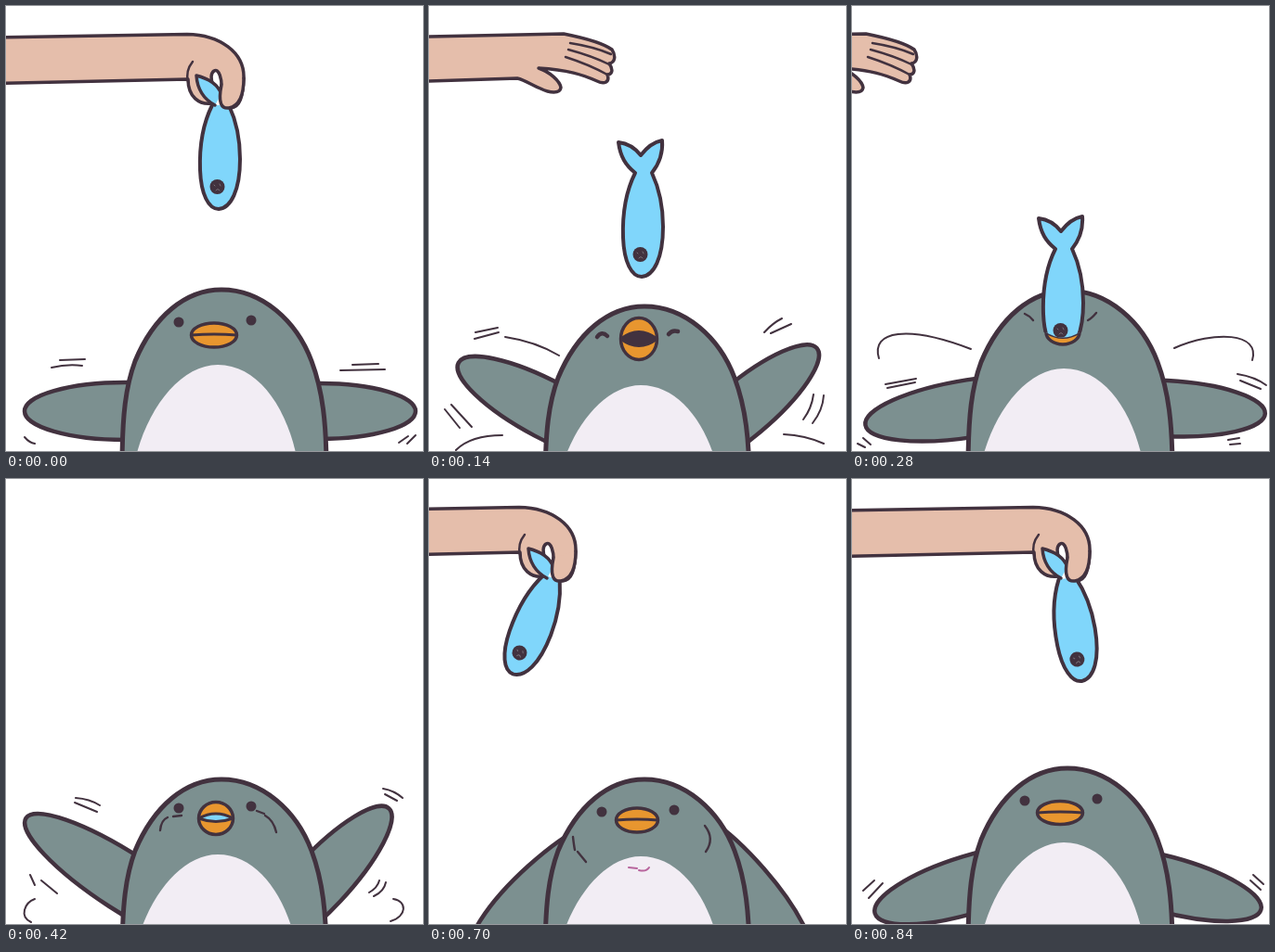
Recreate the animation shown at these times as an HTML page with a canvas. Size 449 by 480 pixels, loop 0.91 s.

```html
<!DOCTYPE html>
<html>
<head>
<meta charset="utf-8">
<style>
html, body { margin: 0; width: 449px; height: 480px; overflow: hidden; background: #fff }
canvas { display: block }
</style>
</head>
<body>
<canvas width="449" height="480"></canvas>
<script>
const ctx = document.querySelector('canvas').getContext('2d');
const INK = '#42323f', GREY = '#7c9090', SKIN = '#e5beab', BLUE = '#80d6fb', ORANGE = '#e8962f', BELLY = '#f2edf4';
const STEP = 70, STEPS = 13;

// Poses two steps apart; the step between them is their mean.
const keys = {
  body: [0, 18, 1, 18, 0, 18, 6],
  belly: [0, 22, 4, 18, 4, 20, 5],
  wingY: [437, 436, 434, 435, 436, 440, 437],
  leftAngle: [0, 28, -9, 33, -8, -42, -17],
  leftLength: [108, 109, 115, 127, 125, 110, 108],
  rightAngle: [0, -40, 3, -47, 16, 49, 15],
  rightLength: [103, 104, 107, 109, 106, 110, 106],
  eyeY: [341, 341, 341, 337, 341, 341, 341],
  beakX: [224, 226, 227, 226, 226, 224, 224],
  beakY: [355, 341, 351, 348, 347, 350, 354],
  beakW: [24.5, 19.5, 18, 18.5, 18, 22.5, 24.5],
  beakH: [13, 22.5, 13, 17.5, 14.5, 13, 12.5],
  upperLip: [-2, -15, -10, -10, 7, -2, -2],
  lowerLip: [-2, 15, 11, 7, 7, -2, -2]
};
const dotEyes = [1, 0, 0, 1, 0, 1, 1];
const thickMarks = [
  '', 'M181 339Q186 332 192 338M258 336Q262 331 268 333', '', '',
  'M179 339L188 338M262 338Q268 334 272 336', '', ''
];
const thinMarks = [
  '', '', 'M186 331Q191 333 195 338M254 338Q258 336 263 330',
  'M166 361Q167 350 174 347M180 346L189 345M270 340L278 343M279 345Q288 350 291 363',
  'M160 361Q166 351 174 349M186 347Q192 347 202 353M261 345L284 345M292 351Q298 357 300 367',
  'M155 368Q156 377 157 382M160 384L169 395M297 356Q308 370 298 384', ''
];
const streaks = [
  'M58 382L85 381M49 390Q66 386 82 388M373 387L401 386M360 393L408 392M20 465Q25 471 31 472M423 471L433 464M432 472L441 463',
  'M50 352L74 347M49 359L75 352M82 357Q115 362 140 377M361 352Q370 342 380 337M368 353L390 343M17 435L33 455M24 430L46 454M29 479Q45 463 79 463M403 446Q412 434 414 419M413 450Q424 436 425 420M382 462Q405 463 425 472',
  'M29 380C20 350 60 344 128 370M347 369C390 350 440 352 431 382M36 408L69 402M38 412L68 406M415 397Q434 400 446 409M418 404L440 413M6 472L14 476M12 466L20 473M405 468L417 466M407 473L418 472',
  'M75 344Q90 345 101 352M74 349L98 359M406 334Q418 336 427 344M408 340L421 347M26 427L31 438M38 433L55 447M31 453C20 457 14 472 27 478M391 446Q400 441 402 433M396 450Q407 445 409 435M417 453C432 455 432 472 414 477',
  '', '',
  'M12 444L24 433M18 452L33 436M429 433L440 443M432 427L443 437'
];

const FISH_BODY = 'M222 180C212 200 208 222 209 250C210 276 218 292 229 292C242 291 252 272 252 238C252 215 247 195 240 180';
const FREE_TAIL = 'C248 170 252 158 251 145C241 147 234 153 228 161C221 152 213 148 204 147C206 163 212 172 222 180Z';
const HELD_TAIL = 'M225 107C212 100 206 90 205 75C217 78 228 84 232 95';

ctx.lineCap = ctx.lineJoin = 'round';

function draw(path, fill, width, stroke = INK) {
  const shape = typeof path === 'string' ? new Path2D(path) : path;
  if (fill) { ctx.fillStyle = fill; ctx.fill(shape); }
  if (width) { ctx.strokeStyle = stroke; ctx.lineWidth = width; ctx.stroke(shape); }
}

function oval(x, y, rx, ry, fill, width, angle = 0) {
  const shape = new Path2D();
  shape.ellipse(x, y, rx, ry, angle * Math.PI / 180, 0, 7);
  draw(shape, fill, width);
}

function shifted(x, y, paint) {
  ctx.save();
  ctx.translate(x, y);
  paint();
  ctx.restore();
}

function fishEye() {
  oval(227.5, 268, 8, 8, INK);
  draw('M224 266L225 267M230 265L231 267M226 272Q228 269 230 272', null, 1, '#777078');
}

function openHand() {
  draw('M-300 39L145 30C160 33 186 39 197 47C201 53 201 61 194 62C199 69 197 74 192 74C195 82 189 85 181 81C165 74 150 69 118 67C130 71 141 81 142 88C141 95 130 94 120 89C110 85 104 80 95 78L-300 90', SKIN, 3.5);
  draw('M152 40Q178 44 196 52M150 47Q176 54 194 63M147 55Q172 63 192 74', null, 2.5);
}

function holdingHand(swing) {
  draw('M-300 39L195 30.5C230 31 257 50 256 78C255 98 252 109 242 110C230 109 231 103 232 92C233 78 229 67 224 70C220 73 221 78 222 84L222 105C208 107 196 98 196 79L-300 90', SKIN, 3.5);
  draw('M201 60Q193 70 196 82', null, 2.5);
  ctx.save();
  ctx.translate(232, 105);
  ctx.rotate(swing * Math.PI / 180);
  ctx.translate(-232, -105);
  shifted(0, -73, () => { draw(FISH_BODY, BLUE, 4); fishEye(); });
  ctx.restore();
  draw(HELD_TAIL, BLUE, 3.5);
  draw('M232 85C228 105 232 111 240 110C250 108 256 98 256 78', SKIN, 3.5);
}

function render(step) {
  const pose = step >> 1, next = (step + 1) >> 1, p = {};
  for (const k in keys) p[k] = (keys[k][pose] + keys[k][next]) / 2;
  ctx.clearRect(0, 0, 449, 480);

  oval(128, p.wingY, p.leftLength, 31, GREY, 4.5, p.leftAngle);
  oval(338, p.wingY, p.rightLength, 30, GREY, 4.5, p.rightAngle);
  draw(streaks[pose], null, 2);

  shifted(1, p.body, () =>
    draw('M124 500C124 440 128 410 138 383C158 335 192 306 231 306C275 306 312 340 328 383C340 415 344 450 344 500', GREY, 5));
  shifted(0, p.belly, () =>
    draw('M141 482C155 430 190 387 228 387C270 387 300 430 312 482V500H141Z', BELLY));
  if (pose === 5) draw('M215 419L224 420M226 422Q234 424 237 419', null, 2, '#b8659d');

  const x = p.beakX, y = p.beakY, w = p.beakW;
  shifted(0, p.body, () => {
    if (dotEyes[pose]) {
      oval(186, p.eyeY, 5.5, 5.5, INK);
      oval(264, p.eyeY - 2, 5.5, 5.5, INK);
    }
    draw(thickMarks[pose], null, 4.5);
    draw(thinMarks[pose], null, 2.4);
    oval(x, y, w, p.beakH, ORANGE, 3.5);
    draw(`M${x - w} ${y}Q${x} ${y + p.upperLip} ${x + w} ${y}Q${x} ${y + p.lowerLip} ${x - w} ${y}`,
      pose === 3 ? BLUE : INK, 3);
  });

  if (step > 0 && step < 6) {
    const t = step - 2, mouth = y + p.body;
    ctx.save();
    ctx.clip(new Path2D(`M0 0H449V${mouth}H${x + w}Q${x} ${mouth + p.lowerLip} ${x - w} ${mouth}H0Z`));
    shifted(-1.5 * t, 41 * t, () => { draw(FISH_BODY + FREE_TAIL, BLUE, 4); fishEye(); });
    ctx.restore();
    shifted(-65 * t, 0, openHand);
  }
  if (step === 0) holdingHand(0);
  if (step > 8) shifted(49 * (step - 12), 0, () => holdingHand([28, 21, 6, -9.5][step - 9]));
}

function tick() {
  render(Math.floor(performance.now() / STEP) % STEPS);
  requestAnimationFrame(tick);
}
tick();
</script>
</body>
</html>
```
